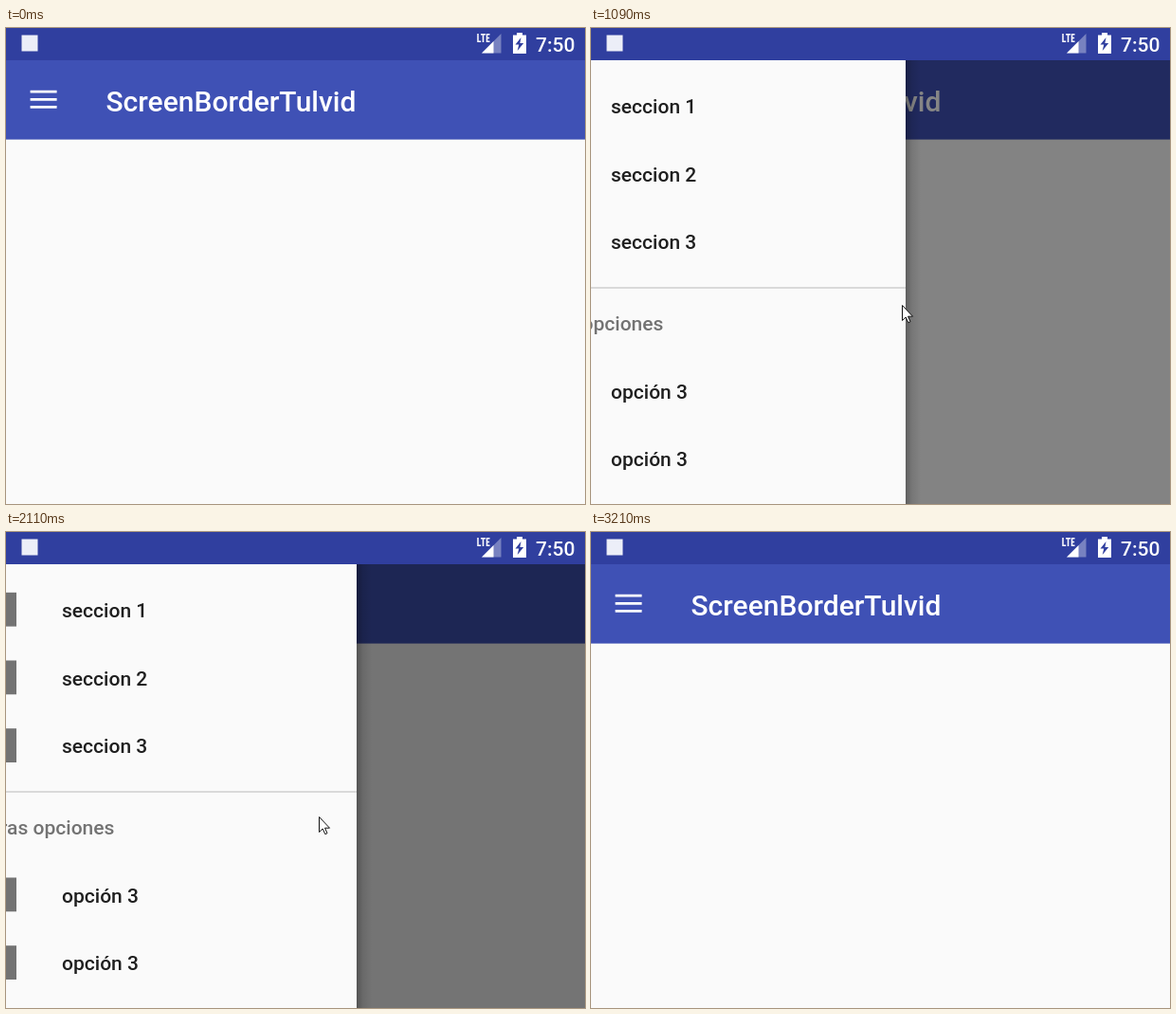
These frames come from a looping animation (611 by 502 pixels, 3.59 s). An HTML page:

```html
<!DOCTYPE html>
<html lang="es">
<head>
<meta charset="utf-8">
<title>Navigation drawer</title>
<style>
  html, body { margin: 0; width: 100%; height: 100%; overflow: hidden; background: #fafafa; }
  svg { display: block; width: 611px; height: 502px; }
  text { font-family: Roboto, sans-serif; font-weight: 500; font-size: 21px; fill: #1f1f1f; }
  .light { fill: #fff; }
  .title { font-size: 30px; }
  .muted { fill: #737373; }
</style>
</head>
<body>
<svg viewBox="0 0 611 502">
  <defs>
    <linearGradient id="fade">
      <stop offset="0" stop-opacity=".28"/>
      <stop offset=".4" stop-opacity=".1"/>
      <stop offset="1" stop-opacity="0"/>
    </linearGradient>
  </defs>

  <rect width="611" height="502" fill="#fafafa"/>
  <rect y="34" width="611" height="83.6" fill="#3f51b5"/>
  <path d="M25.6 67.2h28M25.6 75.3h28M25.6 83.4h28" stroke="#fff" stroke-width="2.8"/>
  <text class="light title" x="105.500" y="87.5">ScreenBorderTulvid</text>

  <rect id="scrim" y="34" width="611" height="468" opacity="0"/>
  <g id="drawer">
    <rect x="416" y="34" width="16" height="468" fill="url(#fade)"/>
    <rect y="34" width="416" height="468" fill="#fafafa"/>
    <rect y="273" width="416" height="2" fill="#d9d9d9"/>
    <text class="muted" x="21" y="319">otras opciones</text>
    <g id="items"></g>
  </g>

  <rect width="611" height="34" fill="#303f9f"/>
  <rect x="16.5" y="7.5" width="17" height="17" fill="#eceef8"/>
  <path d="M522.5 6v20.5h-20.5z" fill="#fff" opacity=".35"/>
  <path d="M514.5 14v12.5h-12.5z" fill="#fff"/>
  <path d="M498 6v8.2h3.2M501 6.8h5M503.5 6v9M510.5 6.8h-3v7.4h3M507.5 10.4h2.6" fill="none" stroke="#fff" stroke-width="1.5"/>
  <path d="M539 5h6v2.5h4v19.5h-14v-19.5h4z" fill="#fff"/>
  <path d="M543.5 10l-6 7.5h3.7l-1.5 6.5 6.5-8h-3.8z" fill="#303f9f"/>
  <text class="light" x="559" y="24.500">7:50</text>

  <path id="cursor" d="M.5.5v16l3.7-3.5 2.6 5.7 2.2-1-2.5-5.5h5z" fill="#fff" stroke="#111"/>
</svg>
<script>
const LOOP = 3590, WIDTH = 416, ROW = 71.7, ICON = 35.8;
const $ = id => document.getElementById(id);
const scrim = $('scrim'), drawer = $('drawer'), cursor = $('cursor');

const item = (label, y) =>
  `<rect class="muted" x="21.2" y="${y}" width="${ICON}" height="${ICON}"/>
   <text x="105" y="${y + 26}">${label}</text>`;
const group = (labels, top) => labels.map((label, i) => item(label, top + i * ROW)).join('');
$('items').innerHTML = group(['seccion 1', 'seccion 2', 'seccion 3'], 63.8)
                     + group(['opción 3', 'opción 3'], 364.5);

const linear = p => p;
const easeOut = p => 1 - (1 - p) ** 2;
const easeIn = p => p ** 1.67;
const smooth = p => p * p * (3 - 2 * p);
const progress = (t, from, to) => t >= to ? 1 : Math.max(0, (t - from) / (to - from));

// Each move carries the pointer on from where the last one left it.
const moves = [
  { from: 70, to: 630, x: 21, y: 291, ease: easeOut },      // come in
  { from: 790, to: 1170, x: 368, y: 292, ease: smooth },    // pull open
  { from: 1170, to: 1330, x: 368, y: 298, ease: linear },
  { from: 1330, to: 1490, x: 401, y: 298, ease: easeOut },
  { from: 1650, to: 1790, x: 397, y: 297, ease: linear },
  { from: 2001, to: 2437, x: -30, y: 313, ease: smooth },   // push shut
  { from: 2890, to: 2890, x: 299, y: 488, ease: linear },   // reappear below
  { from: 2890, to: 3130, x: 524, y: 478, ease: linear }
];

function pointer(t) {
  let x = 229, y = 400;
  for (const m of moves) {
    const p = m.ease(progress(t, m.from, m.to));
    x += (m.x - x) * p;
    y += (m.y - y) * p;
  }
  return [x, y].map(Math.round);
}

// 0 is closed, 1 is open
const openness = t => easeOut(progress(t, 870, 1270)) - easeIn(progress(t, 1950, 2545));

// The picture advances in 80 ms ticks, realigned at a few moments.
function tick(t) {
  const base = [2890, 1710, 930, 70].find(b => t >= b);
  return base === undefined ? 0 : base + 80 * Math.floor((t - base) / 80);
}

function draw(time) {
  const t = tick(time % LOOP), open = openness(t);
  scrim.setAttribute('opacity', 0.6 * open);
  drawer.setAttribute('transform', `translate(${Math.round(WIDTH * open) - WIDTH})`);
  drawer.setAttribute('visibility', open > 0 ? 'visible' : 'hidden');

  cursor.setAttribute('visibility', t >= 70 && t < 3210 ? 'visible' : 'hidden');
  cursor.setAttribute('transform', `translate(${pointer(t)})`);
}

const start = performance.now();
function loop() {
  draw(performance.now() - start);
  requestAnimationFrame(loop);
}
loop();
</script>
</body>
</html>
```
